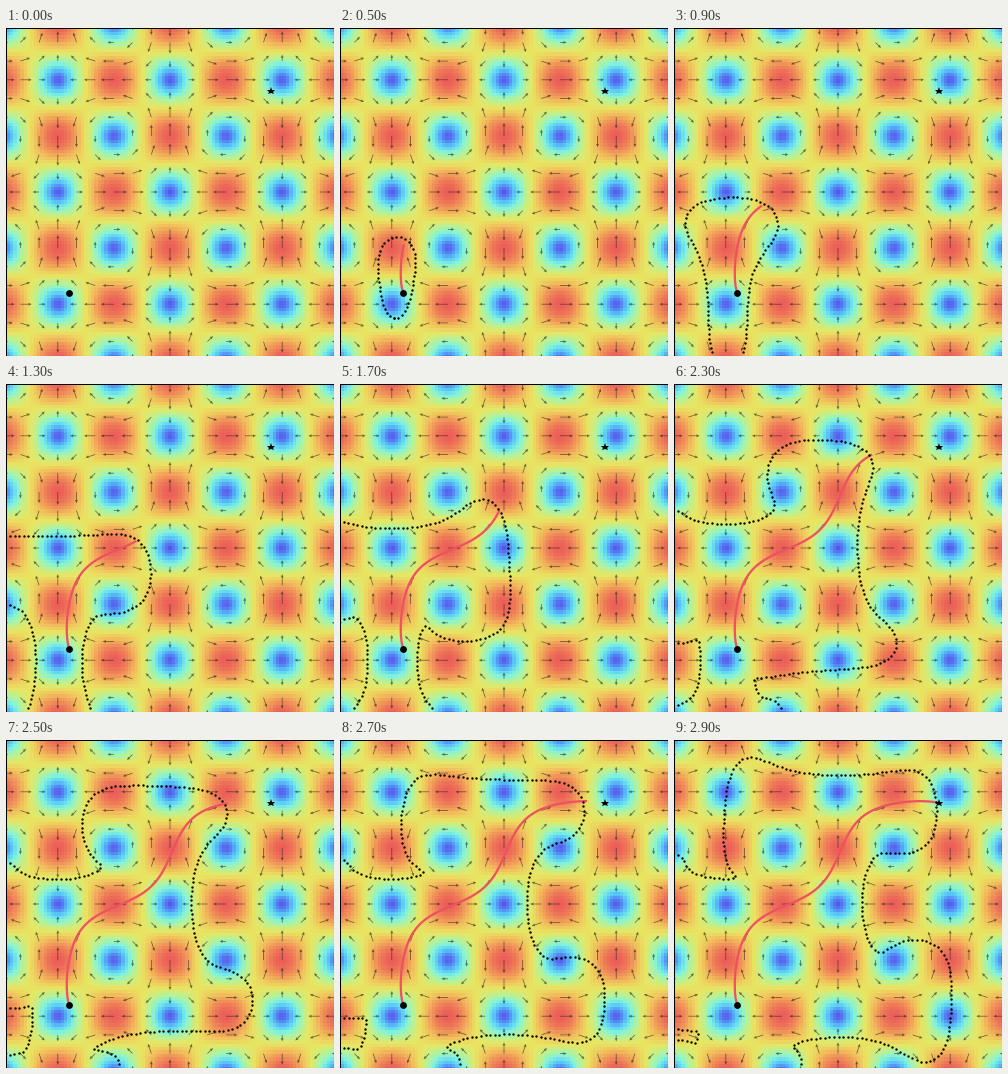
Recreate the animation shown at these times as a matplotlib script. Size 328 by 328 pixels, loop 3 s.

```python
import numpy as np
import matplotlib.pyplot as plt
from matplotlib.animation import FuncAnimation
from matplotlib.colors import LinearSegmentedColormap

SIZE = 328
HALF = SIZE / 2
FRAMES = 30
WAVE = 112.2           # half wavelength of the flow, pixels
K = np.pi / WAVE
THRUST = 0.67          # own speed relative to the strongest current
START = np.array([-101.0, -101.0])
GOAL = -START
REACH = 3 * K          # the goal counts as reached at this distance
STEP = 2.0             # solver grid, pixels
DT = 0.01
T0 = 0.15              # age of the small initial circle


def flow(x, y):
    return -np.sin(K * x) * np.cos(K * y), np.cos(K * x) * np.sin(K * y)


def minmod(a, b):
    return np.where(a * b > 0, np.where(np.abs(a) < np.abs(b), a, b), 0.0)


def slopes(p):
    """Second order one-sided differences along the first axis."""
    lo = np.abs(p[:1] - p[1:2])
    hi = np.abs(p[-1:] - p[-2:-1])
    q = np.concatenate([p[:1] + 2 * lo, p[:1] + lo, p,
                        p[-1:] + hi, p[-1:] + 2 * hi])
    d = np.diff(q, axis=0)
    dd = np.diff(d, axis=0)
    m = 0.5 * minmod(dd[:-1], dd[1:])
    h = K * STEP
    return (d[1:-2] + m[:-1]) / h, (d[2:-1] - m[1:]) / h


grid = np.arange(-160, 161, STEP)
GX, GY = np.meshgrid(grid, grid)
U, V = flow(GX, GY)
NODES = np.c_[GX.ravel(), GY.ravel()].astype(np.float32)

fig = plt.figure(figsize=(4, 4), dpi=82)
ax = fig.add_axes([0, 0, 1, 1])
ax.set_xticks([])
ax.set_yticks([])


def rate(p):
    """Front moves with the current and along its own normal."""
    yb, yf = slopes(p)
    xb, xf = (s.T for s in slopes(p.T))
    drift = U * np.where(U > 0, xb, xf) + V * np.where(V > 0, yb, yf)
    grad = np.sqrt(np.maximum(xb, 0) ** 2 + np.minimum(xf, 0) ** 2
                   + np.maximum(yb, 0) ** 2 + np.minimum(yf, 0) ** 2)
    return -(drift + THRUST * grad)


def sample(p, x, y):
    fx, fy = (x - grid[0]) / STEP, (y - grid[0]) / STEP
    i, j = int(fx), int(fy)
    a, b = fx - i, fy - j
    return ((1 - b) * ((1 - a) * p[j, i] + a * p[j, i + 1])
            + b * ((1 - a) * p[j + 1, i] + a * p[j + 1, i + 1]))


def spread_dots(seg, gap):
    s = np.r_[0, np.cumsum(np.hypot(*np.diff(seg, axis=0).T))]
    at = np.linspace(0, s[-1], max(2, int(round(s[-1] / gap)) + 1))
    return np.c_[np.interp(at, s, seg[:, 0]), np.interp(at, s, seg[:, 1])]


def front_points(p, gap):
    cs = ax.contour(GX, GY, p, levels=[0])
    segs = [s for s in cs.allsegs[0] if len(s) > 2]
    cs.remove()
    return np.vstack([spread_dots(s, gap) for s in segs])


def redistance(p):
    """Restore signed distance so the front stays sharp."""
    pts = front_points(p, 1.0).astype(np.float32)
    base = (NODES ** 2).sum(1)
    best = np.full(len(NODES), np.inf, np.float32)
    for k in range(0, len(pts), 100):
        part = pts[k:k + 100]
        d = (part ** 2).sum(1)[:, None] - 2 * part @ NODES.T
        best = np.minimum(best, d.min(0))
    dist = np.sqrt(np.maximum(best + base, 0)).reshape(p.shape)
    return np.sign(p) * K * dist.astype(float)


def grow_front():
    cx, cy = START + np.array(flow(*START)) * T0 / K
    p = K * np.hypot(GX - cx, GY - cy) - THRUST * T0
    snaps = [p.astype(np.float32)]
    while sample(p, *GOAL) > REACH and len(snaps) < 1000:
        q = p + DT * rate(p)
        p = 0.5 * (p + q + DT * rate(q))
        if len(snaps) % 15 == 0:
            p = redistance(p)
        snaps.append(p.astype(np.float32))
    return snaps


def trace_back(snaps):
    """Fastest route, followed from the goal back to the start."""
    pos = GOAL.copy()
    track = [pos.copy()]
    for p in snaps[:0:-1]:
        x, y = pos
        n = np.array([sample(p, x + STEP, y) - sample(p, x - STEP, y),
                      sample(p, x, y + STEP) - sample(p, x, y - STEP)])
        n /= np.hypot(*n) + 1e-9
        pos = pos - DT / K * (np.array(flow(x, y)) + THRUST * n)
        pos = np.clip(pos, -154, 154)
        track.append(pos.copy())
    track.append(START)
    return np.array(track[::-1])


snaps = grow_front()
route = trace_back(snaps)
per_frame = (T0 + DT * (len(snaps) - 1)) / (FRAMES - 1)


def snap_index(n):
    return int(round((n * per_frame - T0) / DT))


fronts = [np.empty((0, 2))] + [
    front_points(snaps[min(max(snap_index(n), 0), len(snaps) - 1)], 4.6)
    for n in range(1, FRAMES)]

# Current speed as coloured cells
colors = LinearSegmentedColormap.from_list("speed", [
    (0.0, "#5a55ea"), (0.15, "#5484f4"), (0.3, "#5accf8"), (0.44, "#82f4dc"),
    (0.57, "#b8f296"), (0.7, "#e8e663"), (0.82, "#f2be5c"),
    (0.92, "#f08c58"), (1.0, "#ec5f58")])
CELL = WAVE * 3 / 100
c = np.arange(-50, 51) * CELL
edge = 50.5 * CELL
ax.imshow(np.hypot(*flow(*np.meshgrid(c, c))), cmap=colors, vmin=0, vmax=1,
          extent=(-edge, edge, -edge, edge), origin="lower",
          interpolation="nearest")

a = np.arange(-9, 10) * WAVE / 6
AX, AY = np.meshgrid(a, a)
ax.quiver(AX, AY, *flow(AX, AY), units="xy", scale_units="xy",
          angles="uv", scale=1 / 13, width=0.75, headwidth=4, headlength=4.5,
          headaxislength=4, minlength=0.5, color="#1c1c14", alpha=0.62)

path, = ax.plot([], [], color="#ee5260", lw=2, zorder=4)
dots, = ax.plot([], [], "o", color="black", ms=2.1, mew=0, zorder=5)
ax.plot(*START, "o", color="black", ms=6, mew=0, zorder=6)
ax.plot(*GOAL, "*", color="black", ms=7.5, mew=0, zorder=6)

ax.set_aspect("auto")
ax.set_xlim(-HALF, HALF)
ax.set_ylim(-HALF, HALF)
for spine in ax.spines.values():
    spine.set_linewidth(0.9)


def update(n):
    # The drawn route trails slightly behind the front early on
    lag = 0.8 * (1 - n / (FRAMES - 1))
    end = max(snap_index(n - lag) + 2, 0) if n else 0
    path.set_data(route[:end, 0], route[:end, 1])
    dots.set_data(fronts[n][:, 0], fronts[n][:, 1])
    return path, dots


anim = FuncAnimation(fig, update, frames=FRAMES, interval=100, repeat=True,
                     repeat_delay=0, blit=False)
plt.show()
```
